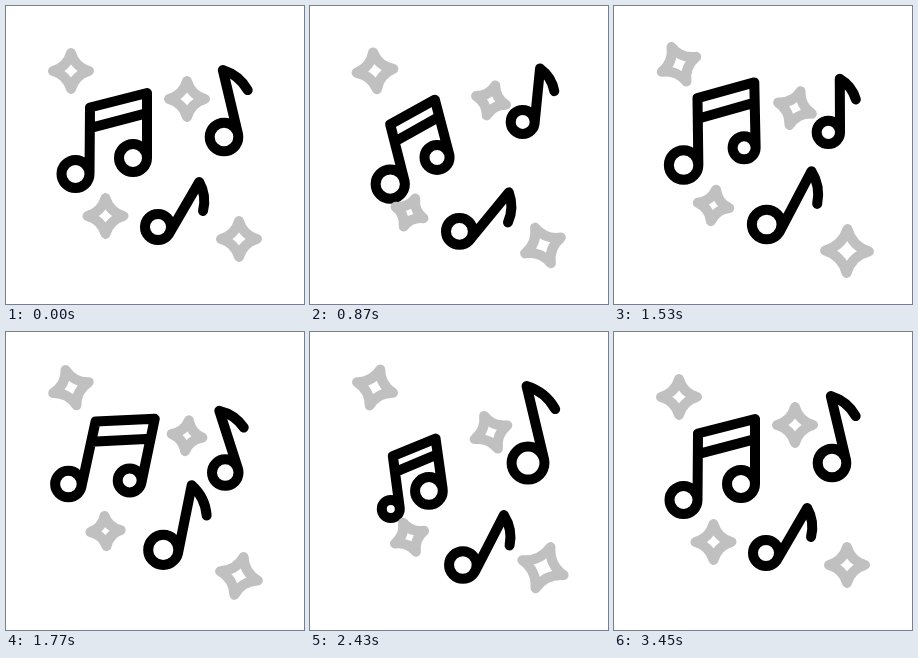
These frames come from a looping animation (298x298 px, 3.6 s). An HTML page:

```html
<!DOCTYPE html>
<html lang="en">
<head>
<meta charset="utf-8">
<title>Music notes</title>
<style>
  html, body { margin: 0; width: 100%; height: 100%; overflow: hidden; background: #fff; }
  svg { display: block; width: 100vw; height: 100vh; }
  path { fill: none; stroke-width: 10; stroke-linecap: round; stroke-linejoin: round; }
</style>
</head>
<body>
<svg id="stage" viewBox="0 0 298 298"></svg>
<script>
const LOOP = 3600, STEP = 30, STAR_TIME = 2685;
const STAR_PATH = "M0-18Q4-4 18 0Q4 4 0 18Q-4 4-18 0Q-4-4 0-18Z";
const stage = document.getElementById("stage");

function addPath(color) {
  const el = document.createElementNS("http://www.w3.org/2000/svg", "path");
  el.setAttribute("stroke", color);
  return stage.appendChild(el);
}

// Sine-eased value through [time, value] key points
function track(...keys) {
  return t => {
    const i = keys.findIndex(k => k[0] > t);
    if (i === 0) return keys[0][1];
    if (i < 0) return keys[keys.length - 1][1];
    const [t0, a] = keys[i - 1], [t1, b] = keys[i];
    return a + (b - a) * Math.sin((t - t0) / (t1 - t0) * Math.PI / 2) ** 2;
  };
}

// Maps local points to the stage: turn in degrees, scale, then shift
function placer(x, y, turn, scale) {
  const a = turn * Math.PI / 180;
  const c = scale * Math.cos(a), s = scale * Math.sin(a);
  return (px, py) => [x + px * c - py * s, y + px * s + py * c];
}

const head = ([x, y], r) =>
  `M${x - r} ${y}a${r} ${r} 0 1 1 ${2 * r} 0a${r} ${r} 0 1 1 ${-2 * r} 0Z`;
const line = (...points) => "M" + points.map(p => p.join(" ")).join("L");
const mix = (a, b, k) => a.map((v, i) => v + (b[i] - v) * k);

// Two heads hang to the left of their stems
const pair = {
  turn: track([150, 0], [1100, -17], [2000, 17], [2430, -8], [3390, 0]),
  size: track([150, 1], [1080, 0.85], [1650, 1.02], [2430, 0.785], [3390, 1]),
  lift: track([150, 0], [950, 7], [1560, -10], [2430, 14], [3390, 0]),
  left: track([150, 14], [1400, 15], [2430, 9], [3390, 14]),
  right: track([150, 14], [1450, 11.5], [2600, 14]),
  path(t) {
    const size = this.size(t), turn = this.turn(t), a = turn * Math.PI / 180;
    const at = placer(112 - 22 * (1 - size), 126 + this.lift(t), turn, size);
    const top1 = at(-28, -24.5), foot1 = at(-28.5, 42);
    const top2 = at(29, -39), foot2 = at(29, 26);
    const hang = ([x, y], r) => head([x - r * Math.cos(a), y - r * Math.sin(a)], r);
    return hang(foot1, this.left(t)) + hang(foot2, this.right(t))
      + line(foot1, top1, top2, foot2)
      + line(mix(top1, foot1, 0.31), mix(top2, foot2, 0.31));
  }
};

// One shape for both single notes; the head is the local zero point
function single(x, y, tilt, base, turn, size, lift) {
  const R = 14.3, L = 67, slant = Math.asin(R / L);
  return {
    path(t) {
      const scale = base * size(t), angle = turn(t);
      const at = placer(x - 0.28 * angle, y + lift(t), tilt + angle, scale);
      const top = at(0, -L), foot = at(R * Math.cos(slant), -R * Math.sin(slant));
      return head(at(0, 0), R * scale) + line(foot, top)
        + "Q" + [...at(16.5, 5.5 - L), ...at(24.5, 20.5 - L)].join(" ");
    }
  };
}

const upper = single(218, 131, -1, 1,
  track([300, 0], [1200, 27], [2020, -13], [2450, 0]),
  track([390, 1], [1200, 0.75], [2430, 1.15], [3300, 1]),
  track([300, 0], [1150, -20], [1960, 14], [2450, 0]));
const lower = single(152, 221, 42.5, 0.91,
  track([300, 0], [1170, 12.5], [2010, -26], [2550, 0]),
  track([450, 1], [1850, 1.16], [2850, 1]),
  track([300, 0], [1170, 6], [1650, -4], [2430, 12], [2850, 0]));

// Each star drifts once, swings left and right, and pulses three times
function star(x, y, rise, grow, swing, start) {
  return {
    el: addPath("#c0c0c0"),
    draw(t) {
      const u = Math.PI * Math.min(1, Math.max(0, (t - start) / STAR_TIME));
      const scale = 1 + grow * Math.sin(3 * u) ** 2;
      const turn = swing * Math.sin(2 * u);
      this.el.setAttribute("d", STAR_PATH);
      this.el.setAttribute("transform",
        `translate(${x} ${y + rise * Math.sin(u) ** 2}) rotate(${turn}) scale(${scale})`);
      this.el.style.strokeWidth = 10 / scale;
    }
  };
}

const notes = [pair, upper, lower].map(shape => ({ shape, el: addPath("#000") }));
const stars = [
  star(233, 233, 12, 0.22, -24, 165),
  star(99.5, 210, -11, -0.17, 24, 360),
  star(181, 93, 11, -0.17, 24, 555),
  star(65, 65, -11, 0.22, -24, 765)
];

function draw(t) {
  for (const n of notes) n.el.setAttribute("d", n.shape.path(t));
  for (const s of stars) s.draw(t);
}

const begin = performance.now();
function tick(now) {
  const t = Math.max(0, now - begin) % LOOP;
  draw(Math.floor(t / STEP) * STEP);
  requestAnimationFrame(tick);
}
draw(0);
requestAnimationFrame(tick);
</script>
</body>
</html>
```
